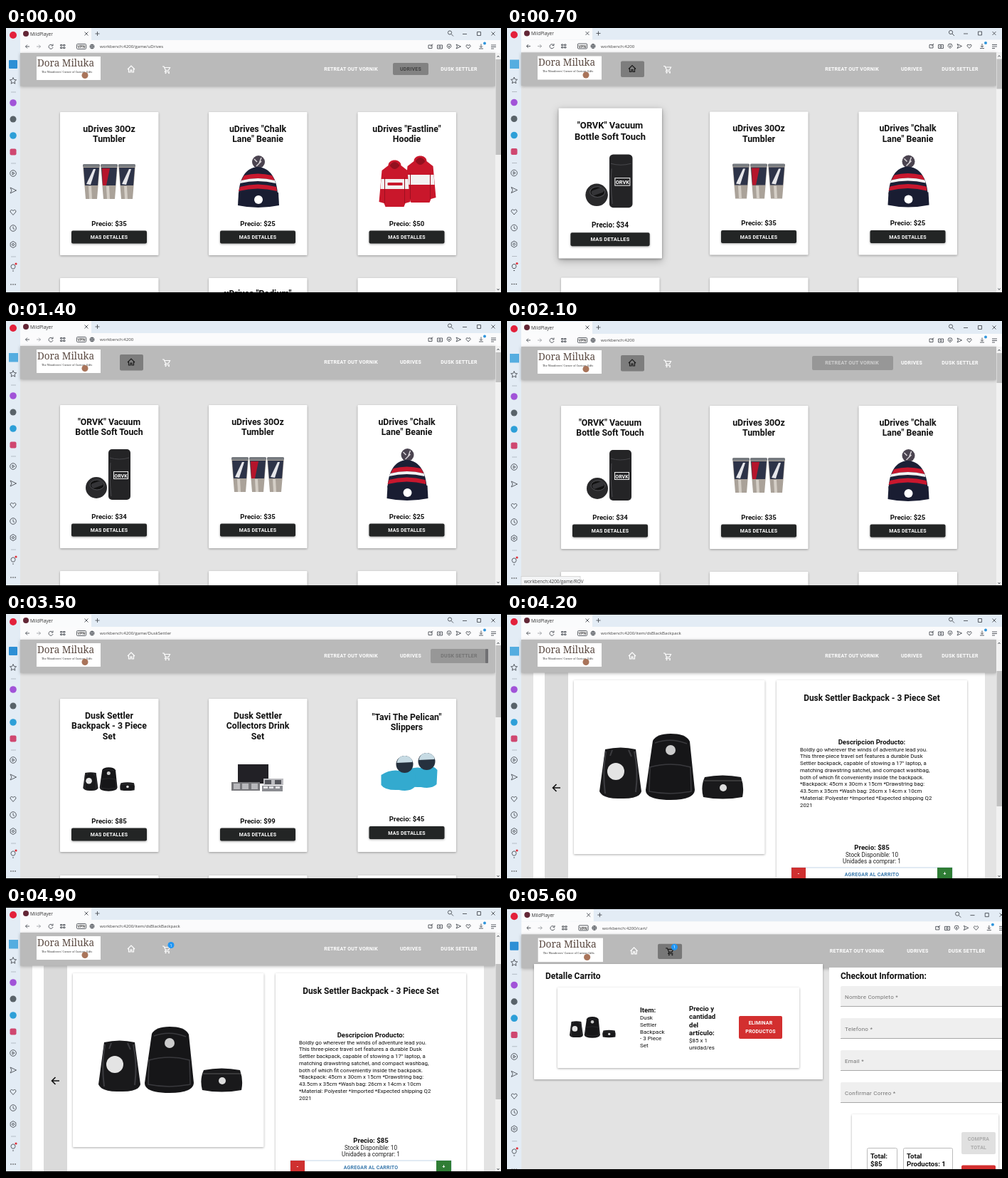
Write an HTML page that moves like this. It is 696x372 px and loops after 6.3 s.

```html
<!DOCTYPE html>
<html lang="es">
<head>
<meta charset="utf-8">
<title>Shop tour</title>
<style>
  html, body { margin: 0; width: 100%; height: 100%; overflow: hidden; background: #000; }
  svg { display: block; width: 696px; height: 372px; font-family: Roboto, sans-serif; }
  .ui { font-family: "Open Sans", sans-serif; }
  .line { fill: none; stroke: #4a4f55; stroke-width: .9; }
  .card { fill: #fff; filter: drop-shadow(0 1px 1.5px #0005); }
  .raised { filter: drop-shadow(0 3px 5px #0004); }
  .caps { letter-spacing: .2px; }
</style>
</head>
<body>
<svg id="stage" viewBox="0 0 696 372"></svg>
<script>
const SLOT = 700;

// Drawing helpers
const rect = (x, y, w, h, fill, extra = '') =>
  `<rect x="${x}" y="${y}" width="${w}" height="${h}" fill="${fill}" ${extra}/>`;
const circle = (x, y, r, fill, extra = '') =>
  `<circle cx="${x}" cy="${y}" r="${r}" fill="${fill}" ${extra}/>`;
const path = (d, fill, extra = '') => `<path d="${d}" fill="${fill}" ${extra}/>`;
const line = (d, extra = '') => `<path class="line" d="${d}" ${extra}/>`;
const group = (transform, content, extra = '') =>
  `<g transform="${transform}" ${extra}>${content}</g>`;
const panel = (x, y, w, h) => rect(x, y, w, h, '#fff', 'class="card" rx="1"');
const text = (x, y, size, words, fill = '#111', extra = '') =>
  `<text x="${x}" y="${y}" font-size="${size}" fill="${fill}" ${extra}>${words}</text>`;
const bold = (x, y, size, words, fill, extra = '') =>
  text(x, y, size, words, fill, `font-weight="700" ${extra}`);
const middle = 'text-anchor="middle"';
const centred = (x, y, size, words, fill) => bold(x, y, size, words, fill, middle);
const caps = (x, y, words, fill = '#fff', size = 7) =>
  bold(x, y, size, words, fill, `${middle} class="caps"`);
const lines = (draw, x, y, step, size, list) =>
  list.map((words, i) => draw(x, y + i * step, size, words)).join('');

// Products, drawn around x = 0 with the page's y
const tumblers = [-37, -12, 13].map((x, i) => group(`translate(${x} 191)`,
  path('M0 1H24L20 49H4Z', '#aaa299') +
  path('M1 5H23L21 30H3Z', '#2d3348') +
  (i === 1 ? path('M2 6H13L8 30H3Z', '#b5152b') : path('M5 28L15 7L18 7L11 29Z', '#e6e6ea')) +
  path('M8 31H12L13 49H9Z', '#d4cec6') +
  rect(0, 0, 24, 4, '#777b80', 'rx="1.5"'))).join('');

const beanie =
  circle(1, 188, 9, '#4b4450') +
  path('M-5 184L-1 188M5 182L2 190M-2 194L5 187', 'none', 'stroke="#d8d4d8" stroke-width="1.5"') +
  path('M-27 234C-26 211 -17 196 0 195C17 196 27 211 28 234Z', '#1b2036') +
  path('M-19 207Q0 202 20 207L24 214Q0 208 -23 214Z', '#c8172e') +
  path('M-23 214Q0 208 24 214L25 218Q0 212 -25 218Z', '#f4f4f4') +
  path('M-25 223Q0 216 26 223L27 229Q0 222 -27 229Z', '#c8172e') +
  path('M-27 231Q0 225 29 231L30 249Q0 255 -28 249Z', '#191d32') +
  circle(1, 241, 6, '#fff');

const hoodieShape = (x, y, s) => group(`translate(${x} ${y}) scale(${s})`,
  path('M-9 10C-9 0 9 0 9 10L18 17L22 61L15 63L13 68H-13L-15 63L-22 61L-18 17Z', '#c9172b') +
  path('M-19 29H19L20 43H-20Z', '#f3f1f1') +
  path('M-7 10Q0 0 7 10Q0 20 -7 10Z', '#92101f') +
  path('M-14 27L-14 63M14 27L14 63', 'none', 'stroke="#9d1020"'));
const hoodie = hoodieShape(19, 177, 1) + hoodieShape(-17, 183, 1) +
  rect(-27, 217, 21, 4, '#c9172b', 'rx="1"');

const bottle =
  rect(-1, 180, 31, 71, '#242426', 'rx="5"') +
  path('M1 192Q14 196 28 192M2 199Q0 220 3 246', 'none', 'stroke="#46464a"') +
  rect(6.5, 211.5, 20, 10, 'none', 'stroke="#eee"') +
  centred(16.5, 219.5, 7, 'ORVK', '#fff') +
  circle(-18, 234, 15, '#29292b') +
  `<ellipse cx="-17" cy="230" rx="10" ry="7" fill="#111" stroke="#505054"/>` +
  rect(-25, 226, 17, 7, '#343437', 'rx="3" transform="rotate(-20 -17 230)"');

const travelSet =
  path('M138 190Q160 185 181 190L189 249Q186 260 160 259Q135 260 130 249Z', '#19191b') +
  path('M139 193Q134 220 138 252M179 193Q185 220 181 250M148 191L145 199M171 191L175 200',
    'none', 'stroke="#3c3c40" stroke-width="2"') +
  circle(153, 221, 12, '#e4e4e4') +
  path('M205 178Q210 168 230 168Q252 168 257 179L264 247Q263 261 230 261Q195 261 195 247Z', '#161618') +
  path('M201 215Q230 207 258 215L259 249Q230 255 200 249ZM208 181Q230 173 253 182',
    'none', 'stroke="#39393d" stroke-width="1.5"') +
  circle(230, 191, 7, '#ccc') +
  path('M278 229Q303 224 329 229Q334 243 331 257Q303 262 276 257Q272 242 278 229Z', '#19191b') +
  path('M277 234H330', 'none', 'stroke="#444" stroke-width="1.5"') +
  circle(304, 244, 5, '#ddd');
const smallSet = group('translate(-83.5 153.7) scale(.36)', travelSet);

const drinkSet =
  rect(-28, 210, 43, 27, '#222126') +
  rect(-37, 235, 40, 12, '#77777b') +
  [-34, -22, -9].map(x => rect(x, 237, 9, 8, '#b8b8bc')).join('') +
  [8, 22].map(x => rect(x, 230, 14, 9, '#bcbcc0') + rect(x + 2, 232, 9, 6, '#55565c')).join('') +
  [6, 14, 23].map(x => rect(x, 240, 12, 8, '#8b8c91') + rect(x + 2, 241, 6, 3, '#e2e2e5')).join('');

const slippers = [[3, -4], [-28, 0]].map(([x, y]) => group(`translate(${x} ${y})`,
  path('M-8 225Q5 217 17 219Q31 212 40 222L39 242Q32 249 17 246Q-3 247 -8 239Z', '#33aacf') +
  circle(25, 210, 12, '#26313e') + path('M14 208Q16 197 26 198Q36 200 36 207Z', '#c7dbe4'))).join('');

// Shop cards: [title lines, price, picture]
const CENTRES = [145, 354, 563.5];
const thermos = [['"ORVK" Vacuum', 'Bottle Soft Touch'], 34, bottle];
const cups = [['uDrives 30Oz', 'Tumbler'], 35, tumblers];
const hat = [['uDrives "Chalk', 'Lane" Beanie'], 25, beanie];
const hoody = [['uDrives "Fastline"', 'Hoodie'], 50, hoodie];
const packs = [['Dusk Settler', 'Backpack - 3 Piece', 'Set'], 85, smallSet];
const glasses = [['Dusk Settler', 'Collectors Drink', 'Set'], 99, drinkSet];
const shoes = [['"Tavi The Pelican"', 'Slippers'], 45, slippers];

function card([title, price, picture], index, tall, hovered) {
  const x = CENTRES[index];
  const top = tall && title.length < 3 ? 147.5 : 145.5;
  const drop = !tall ? 0 : title.length < 3 ? 12.5 : 15;
  const content = panel(x - 69, 118, 138.5, tall ? 215 : 201) +
    lines(centred, x, top, 14.6, 12.3, title) +
    group(`translate(${x} 0)`, picture) +
    centred(x, 277.5 + drop, 9.6, `Precio: $${price}`) +
    rect(x - 53, 284.5 + drop, 106, 18, '#232525', 'rx="2" class="card" style="fill:#232525"') +
    caps(x, 296 + drop, 'MAS DETALLES');
  return hovered
    ? group(`translate(${x} 218.5) scale(1.05) translate(${-x} -218.5)`, content, 'class="raised"')
    : content;
}

function shop(items, { tall = false, hovered = -1, below = '' } = {}) {
  return items.map((item, i) => card(item, i, tall, i === hovered)).join('') +
    CENTRES.map(x => panel(x - 69, tall ? 366 : 351, 138.5, 60)).join('') +
    centred(354, 377, 12.3, below);
}

const itemPage =
  rect(37, 80, 635, 300, '#fff') + rect(53, 80, 33, 300, '#dadada') +
  path('M75 243H65M69.5 238L64.5 243L69.5 248', 'none', 'stroke="#111" stroke-width="1.6"') +
  panel(94, 92, 268.5, 244) + group('translate(0 -1)', travelSet) +
  panel(379, 92, 268, 300) +
  centred(513, 120.5, 11.9, 'Dusk Settler Backpack - 3 Piece Set') +
  centred(513, 181.5, 9.5, 'Descripcion Producto:') +
  lines(text, 412, 191.5, 9.75, 7.8, [
    'Boldly go wherever the winds of adventure lead you.',
    'This three-piece travel set features a durable Dusk',
    'Settler backpack, capable of stowing a 17" laptop, a',
    'matching drawstring satchel, and compact washbag,',
    'both of which fit conveniently inside the backpack.',
    '*Backpack: 45cm x 30cm x 15cm *Drawstring bag:',
    '43.5cm x 35cm *Wash bag: 26cm x 14cm x 10cm',
    '*Material: Polyester *Imported *Expected shipping Q2',
    '2021']) +
  centred(513, 329.5, 9.6, 'Precio: $85') +
  text(513, 339.5, 8.2, 'Stock Disponible: 10', '#222', middle) +
  text(513, 349, 8.2, 'Unidades a comprar: 1', '#222', middle) +
  rect(400, 355, 226, 20, '#fff', 'stroke="#a9c4dc" stroke-width=".7"') +
  rect(400, 355, 20, 20, '#cf3030') + rect(605, 355, 21, 20, '#2f7d35') +
  caps(410, 366, '-') + caps(615.5, 366, '+') + caps(513, 366.5, 'AGREGAR AL CARRITO', '#3a79ad');

const boldLines = (x, y, step, size, list) => lines(bold, x, y, step, size, list);
const cartPage =
  panel(38, 80, 406, 162) + rect(38, 80, 406, 6, '#fff') +
  bold(54, 100.5, 12, 'Detalle Carrito') +
  panel(71, 113, 340, 113) +
  group('translate(46.4 100.2) scale(.32)', travelSet) +
  bold(187, 147.5, 9.6, 'Item:') +
  lines(text, 187, 158, 9.8, 8, ['Dusk', 'Settler', 'Backpack', '- 3 Piece', 'Set']) +
  boldLines(256, 145.5, 11.6, 9.6, ['Precio y', 'cantidad', 'del', 'artículo:']) +
  lines(text, 256, 190, 9.8, 8, ['$85 x 1', 'unidad/es']) +
  rect(326, 153, 61, 32, '#d32f2f', 'rx="2"') +
  caps(356.5, 165, 'ELIMINAR') + caps(356.5, 177, 'PRODUCTOS') +
  rect(453, 85, 250, 300, '#fff') +
  bold(469, 100.5, 12, 'Checkout Information:') +
  ['Nombre Completo *', 'Telefono *', 'Email *', 'Confirmar Correo *'].map((label, i) => {
    const y = 111 + i * 45;
    return rect(469, y, 230, 28, '#efefef', 'rx="2"') + rect(469, y + 28, 230, .8, '#929292') +
      text(475, y + 17.5, 8, label, '#757575', 'letter-spacing=".25"');
  }).join('') +
  panel(485, 291, 206, 100) +
  rect(506.5, 338.5, 42, 50, '#fff', 'rx="2" stroke="#bbb"') +
  rect(557.5, 338.5, 69, 50, '#fff', 'rx="2" stroke="#bbb"') +
  boldLines(511, 352.5, 11.8, 9.6, ['Total:', '$85']) +
  boldLines(562, 352.5, 11.8, 9.6, ['Total', 'Productos: 1']) +
  rect(639, 316, 48, 31, '#e0e0e0', 'rx="2"') +
  caps(663, 327.5, 'COMPRA', '#aaa') + caps(663, 339.5, 'TOTAL', '#aaa') +
  rect(639, 362.5, 48, 30, '#d32f2f', 'rx="2"');

// Browser window
const topIcons =
  line('M110.5 5.5L115.5 10.5M115.5 5.5L110.5 10.5M125.5 8H131.5M128.5 5V11') +
  circle(624, 6.5, 2.6, 'none', 'class="line"') + line('M626 8.5L629 11.5') +
  line('M642 8.5H648M662.5 5.5H667.5V10.5H662.5ZM682.5 5.5L687.5 10.5M687.5 5.5L682.5 10.5') +
  line('M33 26H27.5M30 23.5L27.5 26L30 28.5') +
  line('M43 26H48.5M46 23.5L48.5 26L46 28.5', 'opacity=".5"') +
  line('M65.5 24.5A3 3 0 1 0 66 27M66 22.5V25H63.5') +
  line('M76.5 23.5H79V25H76.5ZM80.5 23.5H83V25H80.5ZM76.5 27H79V28.5H76.5ZM80.5 27H83V28.5H80.5Z') +
  rect(99.5, 22.5, 13, 7, 'none', 'class="line" rx="1"') +
  `<text class="ui" x="106" y="28.2" font-size="5" font-weight="700" fill="#444" ${middle}>VPN</text>` +
  circle(121, 26, 3, 'none', 'class="line"') + line('M118 26H124M121 23Q118.5 26 121 29Q123.5 26 121 23') +
  line('M594 24H599V28.5H594ZM597 26L600 22.5M606.5 24H613.5V29H606.5ZM620 26L621 23H625L626 26L623 29ZM633 23L639.5 26L633 29L634.5 26Z') +
  circle(610, 26.5, 1.3, 'none', 'class="line"') + circle(623, 26, 1, '#4a4f55') +
  line('M650 29L646.8 25.5Q647.5 22 650 24.5Q652.5 22 653.2 25.5ZM668 22.5V27M666 25.5L668 27.5L670 25.5M665 29H671M682 24H689M682 26.5H689M682 29H686') +
  circle(673, 21.5, 2, '#2f95dc');

const sideIcons =
  circle(10, 10, 5, '#e3203b') +
  line('M10 69.5L11.3 72.5L14.5 72.8L12.1 75L12.8 78.2L10 76.5L7.2 78.2L7.9 75L5.5 72.8L8.7 72.5Z') +
  circle(10, 105, 4.8, '#a153d8') + circle(10, 128, 4.5, '#59636a') +
  circle(10, 151, 4.8, '#2d9fd8') + rect(5.5, 169.5, 9, 9, '#cf4770', 'rx="2"') +
  line('M7 90H14M7 190H14M7 321H14', 'opacity=".35"') +
  circle(10, 204, 4.3, 'none', 'class="line"') + line('M9 202L12 204L9 206Z') +
  line('M6 224L14.5 228L6 232L8 228Z') +
  line('M10 262.5L6 258Q6.5 253.5 10 256.5Q13.5 253.5 14 258Z') +
  circle(10, 281, 4.3, 'none', 'class="line"') + line('M10 278.5V281.5L12 282.5') +
  circle(10, 304, 1.5, 'none', 'class="line"') +
  line('M10 299.5L13.8 301.7V306.3L10 308.5L6.2 306.3V301.7Z') +
  line('M8.5 338Q6 335.5 7.5 333Q10 330.5 12.5 333Q14 335.5 11.5 338ZM9 341H11') +
  circle(14, 331, 1.6, '#e0303a') +
  [7, 10, 13].map(x => circle(x, 360, .8, '#333')).join('');

const brand = rect(43, 40, 90, 33, '#fff') +
  `<text x="44" y="53.5" font-family="Noto Serif, serif" font-size="13.5" fill="#5b4a42">Dora Miluka</text>` +
  `<text x="50" y="62.5" font-family="Noto Serif, serif" font-size="3.8" fill="#333">The Wanderers' Corner of Curious Gifts</text>` +
  circle(111, 66.5, 4.5, '#a9745a');

const NAV = {
  rov: [485, 'RETREAT OUT VORNIK', 429, 114],
  drives: [569, 'UDRIVES', 544, 50],
  settler: [637, 'DUSK SETTLER', 597, 81],
};

function navigation({ active, hover, badge }) {
  const homeColor = active === 'home' ? '#1c1c1c' : '#fff';
  const cartColor = active === 'cart' ? '#1c1c1c' : '#fff';
  const links = Object.entries(NAV).map(([key, [x, label, left, width]]) => {
    const on = key === active, over = key === hover;
    const [top, height] = key === 'drives' ? [49, 17] : [48, 20];
    const fill = key === 'drives' ? '#828282' : '#979797';
    const color = over ? '#cfcfcf' : !on ? '#fff' : key === 'drives' ? '#414141' : '#747474';
    return (on || over ? rect(left, top, width, height, fill, 'rx="2"') : '') +
      caps(x, 60, label, color);
  }).join('');
  return rect(20, 35, 668, 46.5, '#bababa', 'style="filter:drop-shadow(0 1px 2px #0004)"') + brand +
    (active === 'home' ? rect(160, 47, 33, 22.5, '#7d7d7d', 'rx="2"') : '') +
    (active === 'cart' ? rect(209, 48, 33.5, 21, '#777', 'rx="2"') : '') +
    line('M171 58L176 53L181 58M172.5 57V62H175V59H177V62H179.5V57', `style="stroke:${homeColor};stroke-width:1.2"`) +
    line('M220 54H222L224.5 59.5H228.5L230.5 55.5H223M224.5 59.5L223.5 61.5H230', `style="stroke:${cartColor};stroke-width:1.2"`) +
    circle(224.5, 63.3, 1, cartColor) + circle(229, 63.3, 1, cartColor) +
    (badge ? circle(232, 52.5, 4.5, '#2196f3') + text(232, 54.5, 5.5, '1', '#fff', middle) : '') +
    links +
    (active === 'settler' ? rect(674, 48, 4, 20, '#707073', 'rx="1"') : '');
}

function render(scene) {
  const { url, body = '', overlay = '', thumb, y = 0, scale = 1, status, pale, edges = [0, 1] } = scene;
  const chrome =
    rect(0, -4, 700, 400, '#e3ecf5') + rect(20, 0, 100, 17, '#fafbfc') +
    rect(20, 17, 680, 18, '#fbfbfc') +
    circle(28, 8, 4, '#632736') + text(34, 10.5, 6.5, 'MildPlayer', '#333', 'class="ui"') +
    topIcons + text(132, 28.2, 6.1, url, '#444', 'class="ui"') +
    (pale ? rect(4, 45, 13, 12.5, '#55ade0') : rect(4, 45, 12, 12, '#2d8fd5', 'rx="1"')) + sideIcons;
  const page = rect(20, 35, 676, 350, '#e3e3e3') + body + navigation(scene) +
    rect(688, 35, 12, 350, '#f1f1f1') + rect(688.5, thumb[0], 7.5, thumb[1], '#c1c1c1') +
    line('M690.5 41L692 39L693.5 41M690.5 366L692 368L693.5 366');
  const bubble = status
    ? rect(20, 357.5, 83, 13, '#f4f5f6', 'stroke="#ccc" stroke-width=".7"') +
      text(24, 366.5, 6.4, status, '#444', 'class="ui"') : '';
  return group(`translate(0 ${y}) scale(${scale})`, chrome + page + bubble) + overlay +
    rect(0, 0, 696, edges[0], '#000') + rect(0, 372 - edges[1], 696, edges[1], '#000');
}

const HOST = 'workbench:4200';
const front = [thermos, cups, hat];
const home = { url: HOST, active: 'home', thumb: [44, 42], body: shop(front), pale: true };
const item = { url: HOST + '/item/dsBlackBackpack', thumb: [79, 190], body: itemPage, y: 1, pale: true, edges: [1, 1] };

const scenes = [
  { url: HOST + '/game/uDrives', active: 'drives', thumb: [44, 134],
    body: shop([cups, hat, hoody], { below: 'uDrives "Podium"' }) },
  { ...home, y: -.5, body: shop(front, { hovered: 0 }) },
  home,
  { ...home, y: 1, hover: 'rov', status: HOST + '/game/ROV' },
  { ...home, y: 1, url: HOST + '/game/ROV', active: 'rov' },
  { url: HOST + '/game/DuskSettler', active: 'settler', thumb: [43, 101], y: 1,
    body: shop([packs, glasses, shoes], { tall: true }) },
  item,
  { ...item, badge: true },
  { url: HOST + '/cart/', active: 'cart', badge: true, thumb: [44, 200], y: 3, scale: 1.0147,
    overlay: cartPage, edges: [3, 4] },
].map(render);

const stage = document.getElementById('stage');
let shown = -1;

function tick() {
  const index = Math.floor(performance.now() / SLOT) % scenes.length;
  if (index !== shown) stage.innerHTML = scenes[shown = index];
  requestAnimationFrame(tick);
}
tick();
</script>
</body>
</html>
```
